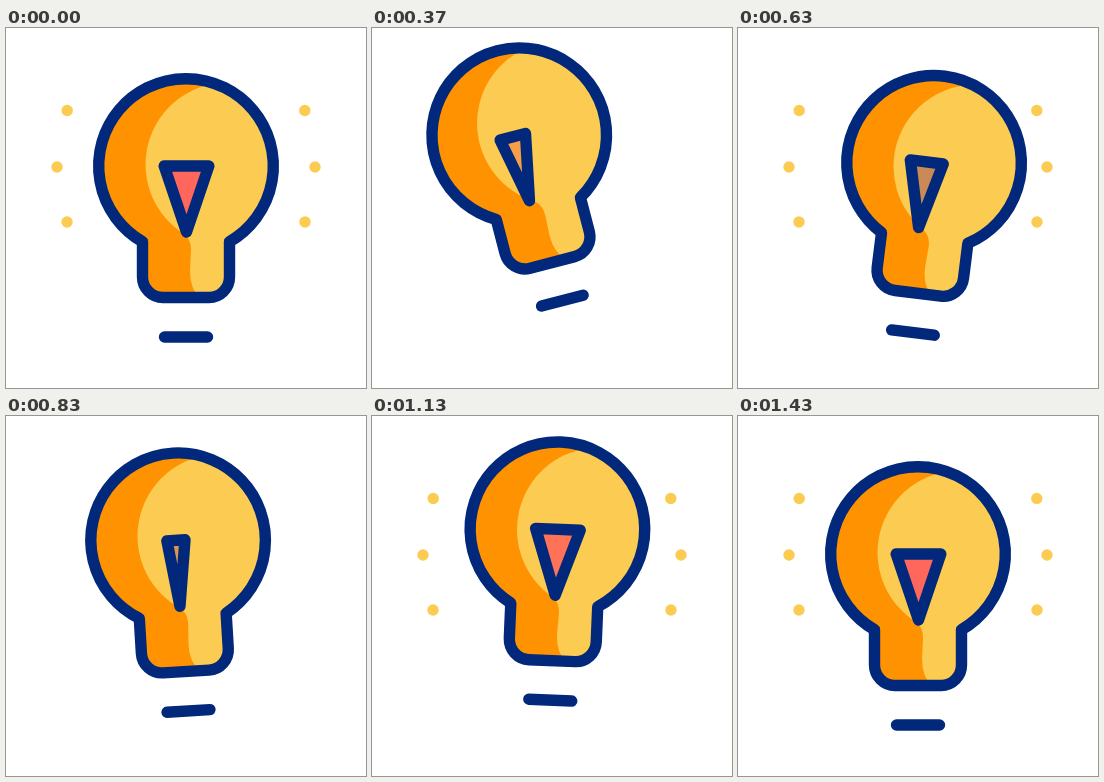
An HTML page for the animation above (1670 ms loop, 360x360 px).

```html
<!DOCTYPE html>
<html lang="en">
<head>
<meta charset="utf-8">
<title>Light bulb</title>
<style>
  html, body { margin: 0; width: 100%; height: 100%; overflow: hidden; background: #fff; }
  svg { display: block; width: 100vw; height: 100vh; }
  .line { stroke: #01287a; stroke-width: 11.4; stroke-linecap: round; stroke-linejoin: round; }
</style>
</head>
<body>
<svg viewBox="0 0 360 360">
  <defs>
    <path id="shape" d="M136.5 213.7A87.3 87.3 0 1 1 223.5 213.7V249a20.5 20.5 0 0 1-20.5 20.5h-46a20.5 20.5 0 0 1-20.5-20.5Z"/>
    <clipPath id="inside"><use href="#shape"/></clipPath>
    <g id="side">
      <circle cx="61.2" cy="82.5" r="5.7"/>
      <circle cx="51" cy="139" r="5.7"/>
      <circle cx="61" cy="194" r="5.7"/>
    </g>
  </defs>
  <g id="dots" fill="#fccb52">
    <use href="#side"/>
    <use href="#side" transform="translate(360) scale(-1 1)"/>
  </g>
  <g id="bulb">
    <use href="#shape" fill="#ff9200"/>
    <path clip-path="url(#inside)" fill="#fccb52"
      d="M206 56A82 82 0 0 0 178 206C183 210 185 215 185 222L184 243Q184 261 194 270H280V45Z"/>
    <use href="#shape" class="line" fill="none"/>
    <path id="filament" class="line"/>
    <path class="line" d="M158.5 309H201.5"/>
  </g>
</svg>
<script>
const LOOP = 1670, FPS = 30, LAST = 43;
const HOP = 20, RISE = 11.5, HEIGHT = 35.2;
const SWING = 8, FIRST_SWING = 11, SWINGS = [0, -14.6, 7.1, -5.3, 2.7, 0];
const AXIS = 176;
const RED = [255, 103, 92], ORANGE = [247, 165, 70], TAN = [200, 138, 85];

const byId = id => document.getElementById(id);
const clamp = (v, max) => Math.min(max, Math.max(0, v));
const ease = u => (1 - Math.cos(Math.PI * u)) / 2;
const mix = (a, b, u) => a + (b - a) * u;

// Two hops: a soft rise, then a straight drop.
function lift(step) {
  if (step >= 2 * HOP) return 0;
  const p = step % HOP;
  return -HEIGHT * (p < RISE ? ease(p / RISE) : (HOP - p) / (HOP - RISE));
}

// The swing dies away from one extreme to the next.
function tilt(step) {
  const phase = step < FIRST_SWING ? step / FIRST_SWING : 1 + (step - FIRST_SWING) / SWING;
  const i = Math.min(Math.floor(phase), SWINGS.length - 2);
  return mix(SWINGS[i], SWINGS[i + 1], ease(phase - i));
}

// Red passes through orange to tan and back.
function tint(step) {
  const u = 2 * Math.max(0, Math.sin(Math.PI * step / (2 * HOP))) ** 3;
  const [from, to] = u < 1 ? [RED, ORANGE] : [ORANGE, TAN];
  return `rgb(${from.map((c, i) => Math.round(mix(c, to[i], u < 1 ? u : u - 1)))})`;
}

function draw(time) {
  const step = Math.min(LAST, Math.floor(time * FPS / 1000 + 0.15));
  byId("bulb").setAttribute("transform",
    `translate(0 ${lift(step)}) rotate(${tilt(step)} 180 268)`);

  // The filament turns once around a vertical axis, 12 degrees a step.
  const turn = Math.cos(clamp(12 * step - 6, 360) * Math.PI / 180);
  const side = x => AXIS + (x - AXIS) * turn;
  const filament = byId("filament");
  filament.setAttribute("d", `M${side(158.2)} 138H${side(202.8)}L${side(180.5)} 204Z`);
  filament.setAttribute("fill", tint(step));

  // Three blinks, ending lit.
  const lit = Math.floor(step * 6 / LAST) % 2 === 0;
  byId("dots").setAttribute("visibility", lit ? "visible" : "hidden");
}

const start = performance.now();
function tick() {
  draw((performance.now() - start) % LOOP);
  requestAnimationFrame(tick);
}
tick();
</script>
</body>
</html>
```
